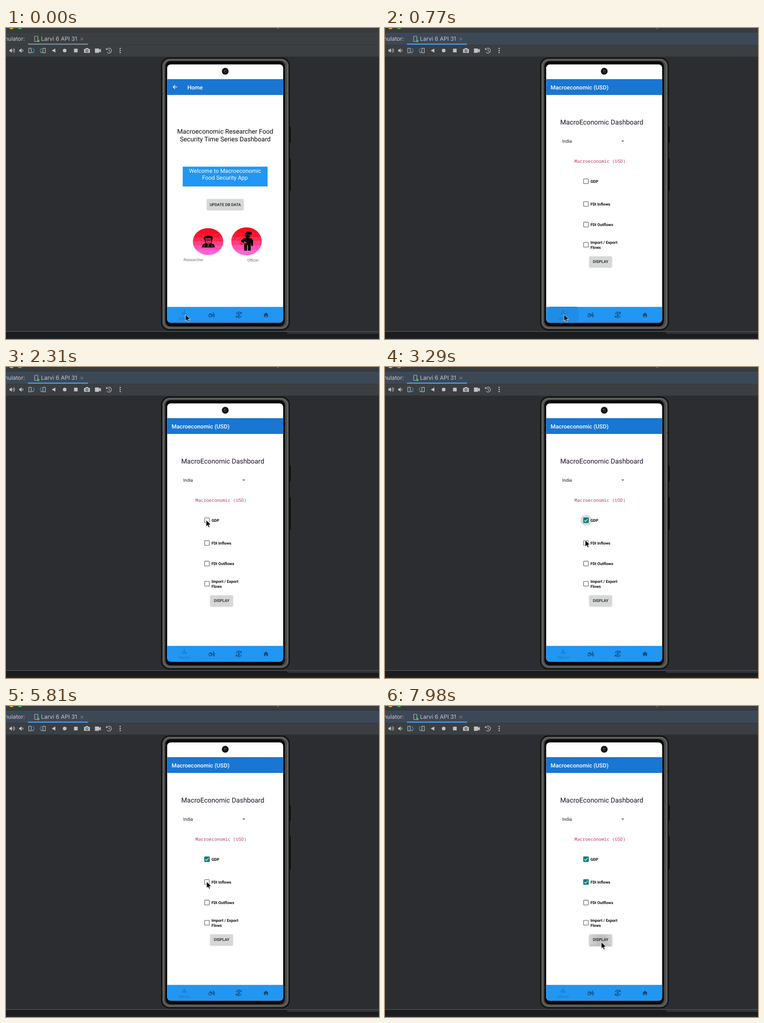
Write an HTML page that moves like this. It is 820x683 px and loops after 8000 ms.

```html
<!DOCTYPE html>
<html lang="en">
<head>
<meta charset="utf-8">
<title>Emulator walkthrough</title>
<style>
html, body { margin: 0; width: 100%; height: 100%; overflow: hidden; background: #2b2d30; }
svg { display: block; width: 820px; height: 683px; }
text { font-family: Roboto, Arial, sans-serif; text-rendering: geometricPrecision; }
.ui { font-family: Inter, Arial, sans-serif; font-size: 12.4px; fill: #c6c8ca; }
.mid { text-anchor: middle; }
.bar { font-size: 12.6px; font-weight: 500; fill: #fff; }
.btn { font-size: 8.65px; font-weight: 500; fill: #1b1b1b; text-anchor: middle; }
.label { font-size: 8.7px; font-weight: 700; fill: #0c0c0c; }
.note { font-size: 8.75px; fill: #757575; }
.mono { font-family: "Noto Sans Mono", "DejaVu Sans Mono", monospace; font-size: 9.87px; fill: #b33f66; }

/* one shared 8 s clock */
.swap { animation: 8s step-end infinite; }
.flow { animation: 8s linear infinite; }
.hide { opacity: 0; }
.focus { animation-name: focus; }
.oldbar { animation-name: oldbar; }
.newbar { animation-name: newbar; }
.home { animation-name: home; }
.dash { animation-name: dash; }
.tick1 { animation-name: tick1; }
.tick2 { animation-name: tick2; }
.ring { animation-name: ring; }
.navripple { animation-name: navripple; }
.halo1 { animation-name: halo1; }
.halo2 { animation-name: halo2; }
.press { animation-name: press; }
.cursor { animation-name: cursor; }

@keyframes focus { 0% { opacity: 0 } .86%, 100% { opacity: 1 } }
@keyframes oldbar { 0% { opacity: 1 } 3.48%, 100% { opacity: 0 } }
@keyframes newbar { 0% { opacity: 0 } 3.48%, 100% { opacity: 1 } }
@keyframes home { 0% { opacity: 1 } 9.58%, 100% { opacity: 0 } }
@keyframes dash { 0% { opacity: 0 } 9.58%, 100% { opacity: 1 } }
@keyframes tick1 { 0% { opacity: 0 } 34.95%, 100% { opacity: 1 } }
@keyframes tick2 { 0% { opacity: 0 } 77.8%, 100% { opacity: 1 } }
@keyframes ring {
  0%, 4.3%, 34.95%, 76.95%, 96.2%, 100% { opacity: 0 }
  2.6%, 33.2%, 73.45%, 94.4% { opacity: .75 }
}
@keyframes navripple { 0%, 3.4% { opacity: 0 } 4.3%, 9.7% { opacity: 1 } 12.25%, 100% { opacity: 0 } }
@keyframes halo1 { 0%, 34.9% { opacity: 0 } 36.5%, 41.3% { opacity: .14 } 44.6%, 100% { opacity: 0 } }
@keyframes halo2 { 0%, 76.9% { opacity: 0 } 79%, 85% { opacity: .14 } 88.4% { opacity: .08 } 91%, 100% { opacity: 0 } }
@keyframes press { 0%, 95.4% { opacity: 0 } 98%, 100% { opacity: 1 } }
@keyframes cursor {
  0%, 8.75% { transform: translate(394.5px, 629px) }
  9.6%, 15.75% { transform: translate(393.5px, 629px) }
  16.6% { transform: translate(390px, 632px) }
  18.75% { transform: translate(410px, 600px) }
  21.25% { transform: translate(458px, 500px) }
  23.75% { transform: translate(452px, 390px) }
  26.25% { transform: translate(440px, 340px) }
  28.8%, 35.9% { transform: translate(440px, 336px) }
  41.1% { transform: translate(440px, 380px) }
  46.4%, 51.6% { transform: translate(440.5px, 386.5px) }
  53.4%, 85.75% { transform: translate(441px, 385.5px) }
  86.6% { transform: translate(452px, 435px) }
  87.5% { transform: translate(465px, 485px) }
  88.4% { transform: translate(472px, 505px) }
  91%, 100% { transform: translate(475.5px, 518.5px) }
}
</style>
</head>
<body>
<svg viewBox="0 0 820 683">
<defs>
  <linearGradient id="bands" x2="0" y2="1">
    <stop offset=".2" stop-color="#fb0d22"/><stop offset=".2" stop-color="#ff1632"/>
    <stop offset=".34" stop-color="#ff1632"/><stop offset=".34" stop-color="#ff2a55"/>
    <stop offset=".48" stop-color="#ff2a55"/><stop offset=".48" stop-color="#ff3f80"/>
    <stop offset=".63" stop-color="#ff3f80"/><stop offset=".63" stop-color="#ff52ac"/>
    <stop offset=".8" stop-color="#ff52ac"/><stop offset=".8" stop-color="#ff62d8"/>
  </linearGradient>
  <radialGradient id="glow" gradientUnits="userSpaceOnUse" cx="475" cy="514" r="26">
    <stop offset="0" stop-color="#bcbcbc"/><stop offset=".5" stop-color="#c6c6c6"/><stop offset="1" stop-color="#d4d5d5"/>
  </radialGradient>
  <filter id="soft" x="-20%" y="-40%" width="140%" height="190%"><feGaussianBlur stdDeviation="1.4"/></filter>
  <clipPath id="screen"><rect x="354.300" y="80" width="255" height="567.300" rx="8"/></clipPath>
  <clipPath id="nav"><path d="M354 612.500h256V648H354z"/></clipPath>
  <g id="box"><rect x="-5.200" y="-5.200" width="10.400" height="10.400" rx="1" fill="#fff" stroke="#6c6c6c" stroke-width="1.300"/></g>
  <g id="tick"><rect x="-5.900" y="-5.900" width="11.800" height="11.800" rx="1.200" fill="#0a7e78"/>
    <path d="M-3.700 .2l2.500 2.500 5-5.200" fill="none" stroke="#fff" stroke-width="1.300"/></g>
</defs>

<!-- desktop window -->
<rect width="820" height="683" fill="#2b2d30"/>
<rect width="820" height="63" fill="#3c3f41"/>
<rect width="820" height="9" fill="#393b3d"/>
<circle cx="12" cy="-3" r="5.500" fill="#f5b32f"/>
<circle cx="31" cy="-3" r="5.500" fill="#2bc840"/>
<path d="M597 1.500h1.500l1-1.500" fill="none" stroke="#aeb0b2"/>
<path d="M0 9.500h820M0 37.500h820M0 63h820" stroke="#323436"/>
<rect x="48" y="34" width="132.500" height="3" rx="1" fill="#718391"/>
<g class="swap focus">
  <rect y="10" width="820" height="27" fill="#3d4857"/>
  <rect x="48" y="34" width="132.500" height="3" rx="1" fill="#4a8fd6"/>
</g>
<text class="ui" x="41.500" y="28" text-anchor="end">Emulator:</text>
<text class="ui" x="77" y="28">Larvi 6 API 31</text>
<g fill="none" stroke="#b5b8ba" stroke-width="1.200">
  <rect x="63" y="18" width="7" height="11.500" rx="1"/>
  <path d="M164 21.500l5.500 5.500m0-5.500l-5.500 5.500" stroke="#777a7d"/>
</g>
<circle cx="71" cy="28.500" r="2.500" fill="#3fc95a"/>

<!-- emulator toolbar -->
<g fill="#bfc1c3">
  <path id="speaker" d="M7.500 47.500h2.300l3.200-3v10l-3.200-3H7.500z"/>
  <use href="#speaker" x="21.500"/>
  <path d="M100.500 49.500l8-4.500v9z"/>
  <circle cx="129" cy="49.500" r="4"/>
  <rect x="149.500" y="45.500" width="8" height="8"/>
  <path d="M171.500 46h3l1.500-2h4l1.500 2h3v8.500h-13z"/>
  <path d="M195.500 45h9v3l4-2.500v8.500l-4-2.500v3h-9z"/>
  <circle cx="251" cy="45" r="1.400"/><circle cx="251" cy="49.500" r="1.400"/><circle cx="251" cy="54" r="1.400"/>
</g>
<circle cx="178" cy="50" r="2.300" fill="#bfc1c3" stroke="#3c3f41" stroke-width="1.200"/>
<g fill="none" stroke="#bfc1c3" stroke-width="1.200">
  <path d="M15 47.300q2 2.200 0 4.400M16.500 44.800q5 4.700 0 9.400M36.500 47.300q2 2.200 0 4.400"/>
  <rect x="50" y="44.500" width="5.500" height="10"/>
  <rect x="81" y="44.500" width="5.500" height="10"/>
  <path d="M221.500 47a5.500 5.500 0 1 1 .5 6M220.500 44v3.500h3.500M226.500 46.500v3.500l2.500 1.500"/>
  <path d="M58 45q4 1.500 4 4.500t-4 5m0-3v3h3M79 45q-4 1.500-4 4.500t4 5m0-3v3h-3" stroke="#4a9ad4"/>
</g>

<!-- bottom edge -->
<rect y="666" width="820" height="17" fill="#1b1c1e"/>
<path d="M0 666.500h820" stroke="#626467"/>
<path d="M617 667.500q1 4 5 4h198v-4z" fill="#333538"/>
<rect y="680" width="820" height="3" fill="#232427"/>

<!-- phone body: rim, metal band with a bright ridge, bezel -->
<g fill="#0b0b0b">
  <rect x="622" y="217" width="4" height="35" rx="1"/>
  <rect x="622" y="286" width="4" height="72" rx="1"/>
  <rect x="341" y="65" width="283" height="599" rx="18"/>
</g>
<rect x="343" y="67" width="279" height="595" rx="16" fill="#3b3d3a"/>
<rect x="346" y="69.500" width="273" height="589.500" rx="14" fill="#4b4d4a" stroke="#6a6c69" stroke-width="2"/>
<rect x="350.500" y="73" width="262.500" height="582" rx="11" fill="#060606" stroke="#1c1d1c"/>
<path d="M341 143.500h5M619 143.500h5" stroke="#1a1b1a"/>

<g clip-path="url(#screen)">
  <rect x="354" y="80" width="256" height="568" fill="#fff"/>
  <circle cx="482" cy="95" r="7.500" fill="#111"/>
  <circle cx="482" cy="95" r="4" fill="#232528"/>
  <circle cx="480.500" cy="93.500" r="1.100" fill="#777b80"/>
  <rect x="354" y="112.300" width="256" height="34.700" fill="#1976d2"/>

  <g class="swap oldbar">
    <path d="M376 129.500h-8.500m4.200-4.300l-4.300 4.300 4.300 4.300" fill="none" stroke="#fff" stroke-width="1.300"/>
    <text class="bar" x="398.700" y="134.500">Home</text>
  </g>
  <text class="bar swap newbar hide" x="364" y="134.500">Macroeconomic (USD)</text>

  <!-- home page -->
  <g class="swap home">
    <g class="mid" font-size="14.120" fill="#0a0a0a">
      <text x="482" y="232">Macroeconomic Researcher Food</text>
      <text x="482" y="248.700">Security Time Series Dashboard</text>
    </g>
    <rect x="388.500" y="304.500" width="186.500" height="43.500" fill="#2196f3"/>
    <g class="mid" font-size="12.430" fill="#fff">
      <text x="481.500" y="318">Welcome to Macroeconomic</text>
      <text x="481.500" y="332.500">Food Security App</text>
    </g>
    <rect x="442" y="377" width="80" height="23" rx="1.500" fill="#999" filter="url(#soft)" opacity=".6"/>
    <rect x="441.500" y="375.500" width="80.500" height="23.500" rx="1.500" fill="#d6d7d7"/>
    <text class="btn" x="482" y="390.500">UPDATE DB DATA</text>

    <ellipse cx="444.200" cy="469" rx="33.500" ry="29.500" fill="url(#bands)"/>
    <ellipse cx="528.700" cy="468.500" rx="33.500" ry="30.800" fill="url(#bands)"/>
    <!-- researcher -->
    <g fill="#120408">
      <path d="M435 464q-2-3 1-5 1-3 5-2 4-2.500 7 0 5-1.500 5.500 2.500 3 2 0 5l-1.500 1.500q-1-4-3.500-5-5 1.500-9 .5-2 2-3 4z"/>
      <path d="M430.500 482q0-6 4-7.500l5.500-2.500 4.700 5 4.800-5 5.500 2.500q4 1.500 4 7.500z"/>
    </g>
    <g fill="none" stroke="#120408" stroke-width="1.200">
      <path d="M437 464q0 10 7.800 10.500 8-.5 8-10.500"/>
      <rect x="438.500" y="464" width="5" height="3.500" rx="1.500"/>
      <rect x="446" y="464" width="5" height="3.500" rx="1.500"/>
      <path d="M443.500 465h2.500M442 471h5.500"/>
    </g>
    <path d="M436 481l1-5m16 5l-1-5m-9.500 5l2-4 2 4" fill="none" stroke="#ff52ac" stroke-width=".9"/>
    <!-- officer -->
    <g fill="#0d0406">
      <path d="M525 453q0-4 6-5.500 6-.5 9.500 1.500l-.5 4.500-3.500 1v3.500q-1.500 4-5.500 4-4.500-.5-5-5z"/>
      <path d="M523 461.500h14.500q4.500 1 5.500 5v12h-3.500l-1.500-7v17.500h-6v-12h-2v12h-6.500v-16l-6.500-3-1-2.500 5-4.500z"/>
    </g>
    <path d="M523.500 468l6 3.500-6 3z" fill="#ff3568"/>
    <path d="M515 471l5 4-1.500 2.500z" fill="#8d0c2a"/>
    <path d="M525.500 454.500h11" stroke="#ff1632" stroke-width=".8"/>
    <text class="note" x="390.300" y="512">Researcher</text>
    <text class="note" x="530" y="513">Officer</text>
  </g>

  <!-- dashboard page -->
  <g class="swap dash hide">
    <text class="mid" x="476.500" y="211.500" font-size="14.800" fill="#1f1129">MacroEconomic Dashboard</text>
    <text x="389.500" y="252" font-size="9.900" fill="#222">India</text>
    <path d="M519.500 247h6.500l-3.250 3.300z" fill="#6a6a6a"/>
    <text class="mono" x="416.500" y="296">Macroeconomic (USD)</text>

    <circle class="flow halo1 hide" cx="441.800" cy="336.500" r="12.200"/>
    <circle class="flow halo2 hide" cx="441.800" cy="386.500" r="11.500"/>
    <use href="#box" x="441.800" y="336.500"/>
    <use href="#box" x="441.800" y="386.500"/>
    <use href="#box" x="441.800" y="431.700"/>
    <use href="#box" x="441.800" y="476"/>
    <use class="swap tick1 hide" href="#tick" x="441.800" y="336.500"/>
    <use class="swap tick2 hide" href="#tick" x="441.800" y="386.500"/>
    <g class="label">
      <text x="451.700" y="339.700">GDP</text>
      <text x="451.700" y="389.800">FDI Inflows</text>
      <text x="451.700" y="435">FDI Outflows</text>
      <text x="451.700" y="474.300">Import / Export</text>
      <text x="451.700" y="484.500">Flows</text>
    </g>

    <rect x="449.500" y="503" width="49" height="23" rx="1.500" fill="#999" filter="url(#soft)" opacity=".6"/>
    <rect x="449" y="501.500" width="50" height="23.300" rx="1.500" fill="#d6d7d7"/>
    <g class="flow press hide">
      <rect x="449" y="504" width="50" height="24" rx="2" fill="#999" filter="url(#soft)" opacity=".5"/>
      <rect x="449" y="501.500" width="50" height="23.300" rx="1.500" fill="url(#glow)"/>
    </g>
    <text class="btn" x="474" y="516">DISPLAY</text>
  </g>

  <!-- bottom navigation -->
  <rect x="354" y="612.500" width="256" height="35" fill="#2196f3"/>
  <g clip-path="url(#nav)"><circle class="flow navripple hide" cx="391.500" cy="630" r="35" fill="#1f8de6"/></g>
  <g fill="#1a78c6">
    <path d="M387.300 624h2v6h-2zM390.900 619.500h2v10.500h-2zM394.600 625.500h2v4.500h-2z"/>
    <text class="mid" x="392" y="640.500" font-size="8.600">Macro</text>
  </g>
  <g fill="none" stroke="#12426c" stroke-width="1.150">
    <circle cx="448.800" cy="631.800" r="2.900"/>
    <circle cx="456.700" cy="632.700" r="1.900"/>
    <path d="M447 627.200h3.500l2 4.300h2M452 629h6.500v1.500M455.700 628.500v-3h1.800"/>
    <path d="M506 628.500a6 6 0 0 1 10.800-2.200M517.500 631.500a6 6 0 0 1-10.800 2.200M517.500 624v3.200h-3.500M506 636v-3.200h3.500"/>
    <path d="M514 628q-.8-1.300-2.300-1.300-2.300 0-2.300 1.600t2.300 1.700q2.500.3 2.500 1.800t-2.500 1.600q-1.800 0-2.500-1.400M511.700 625.500v9" stroke-width="1"/>
  </g>
  <path d="M10 20v-6h4v6h5v-8h3L12 3 2 12h3v8z" transform="translate(564.600 623.200) scale(.58)" fill="#12426c"/>
</g>

<!-- pointer -->
<g class="flow cursor">
  <circle class="swap ring hide" r="20.300" fill="none" stroke="#222" stroke-width="1.300"/>
  <path d="M0 0v14.500l3.300-3.100 2.200 5 2.500-1.100-2.200-4.800h4.600z" fill="#000" stroke="#fff" stroke-width=".9" stroke-linejoin="round"/>
</g>
</svg>
</body>
</html>
```
